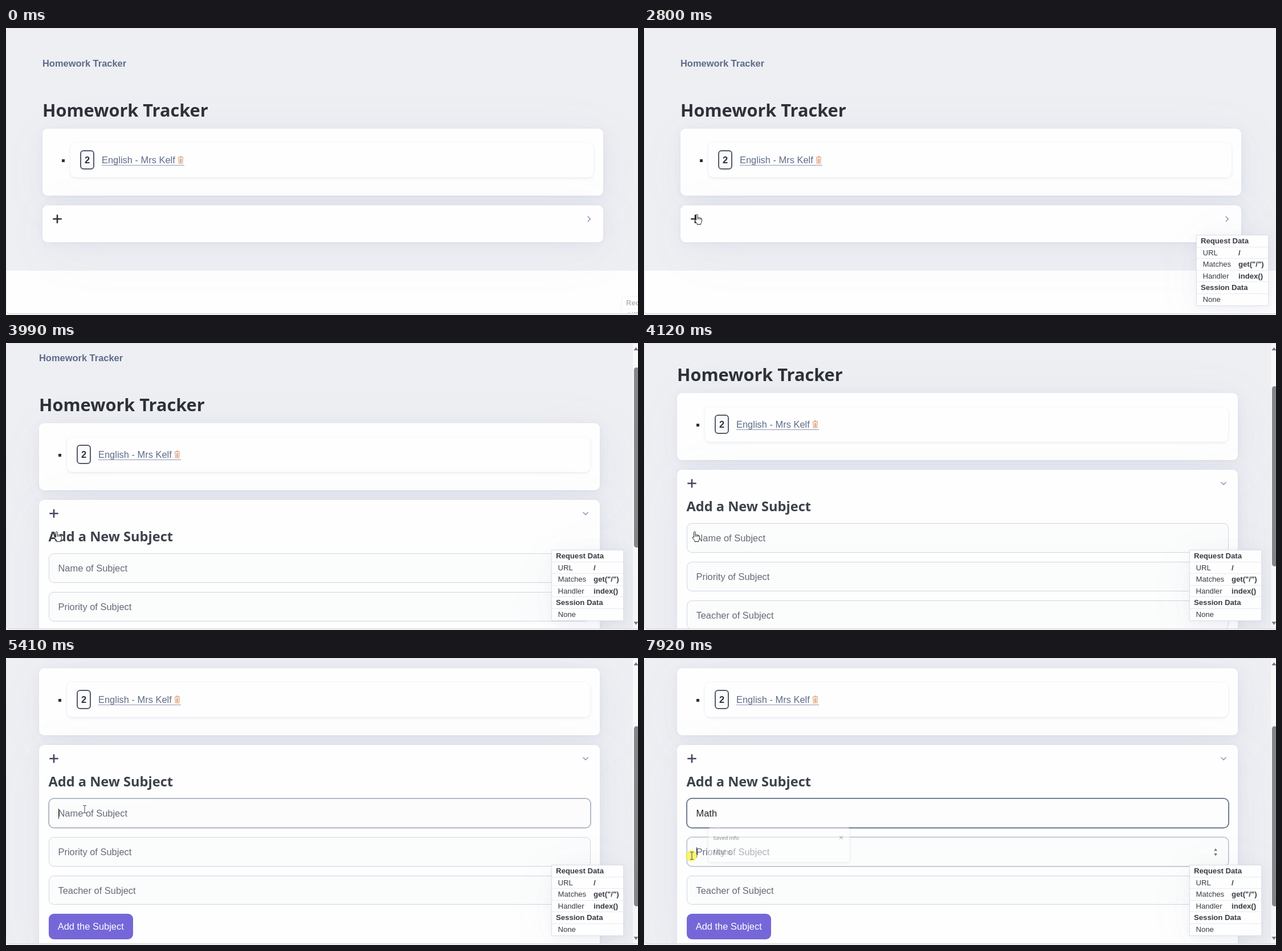
These frames come from a looping animation (1109 by 505 pixels, 8000 ms). An HTML page:

```html
<!DOCTYPE html>
<html lang="en">
<head>
<meta charset="utf-8">
<title>Homework Tracker</title>
<style>
  html, body { margin: 0; width: 100%; height: 100%; overflow: hidden; background: #fefefe; }
  body { position: relative; font: 16.45px/20px Arial, "Liberation Sans", sans-serif; color: #373c44; }
  div, span.t, svg { position: absolute; box-sizing: border-box; }
  svg { overflow: visible; }
  .t { white-space: nowrap; }
  #view { left: 0; top: 0; width: 1109px; height: 503px; overflow: hidden; background: #fefefe; border-radius: 6px 0 0 6px; }
  #page { left: 0; top: 0; width: 1109px; height: 900px; }
  #grey { left: -20px; top: -20px; width: 1160px; background: #eeeff3; }
  #frame { left: 0; top: 0; width: 1120px; height: 504px; border: 1px solid #e0e2e6; border-bottom: 2px solid #dfe1e4; border-radius: 6px; }
  .card, #panel {
    background: #fefefe;
    box-shadow: .24px .48px 2.9px rgba(129,145,181,.017), .55px 1.1px 6.6px rgba(129,145,181,.024),
      1px 2px 12.3px rgba(129,145,181,.03), 1.9px 3.7px 22px rgba(129,145,181,.036),
      3.4px 6.9px 41px rgba(129,145,181,.043), 8.2px 16.5px 99px rgba(129,145,181,.06),
      0 0 0 1px rgba(129,145,181,.015);
  }
  .card { left: 64px; width: 984px; border-radius: 9px; }
  .head { font-family: "Open Sans", "Noto Sans", sans-serif; font-weight: 700; color: #2d3138; }
  #item { left: 49px; top: 25px; width: 918px; height: 61px; border-radius: 9px; background: #fefefe; box-shadow: 0 1px 4px rgba(129,145,181,.22); }
  #badge { left: 17px; top: 13px; width: 25px; height: 34px; border: 2px solid #565a6c; border-radius: 6px; background: #f9fafc; font-weight: 700; line-height: 30px; text-align: center; color: #2d3138; }
  #link { left: 55px; top: 20px; width: 144.5px; height: 20px; color: #5d6b89; border-bottom: 1px solid #8d98b0; }
  .field { left: 16.5px; width: 951px; height: 51.5px; border: 1px solid #cfd5e2; border-radius: 9px; background: #fbfcfc; }
  .field .t { left: 16px; top: 15px; }
  .hint { color: #646b79; }
  .focus { inset: -2px; border: 2px solid #4b5a78; border-radius: 10px; background: #fefefe; opacity: 0; }
  .caret { display: inline-block; width: 1px; height: 18px; margin-right: -1px; vertical-align: -4px; background: #222; }
  .value { color: #23262c; }
  #button { left: 16.5px; top: 297.5px; width: 148.5px; height: 44.5px; border-radius: 9px; background: #7567d8; color: #fff; line-height: 44px; text-align: center; }
  #popup { left: 112px; top: 298px; width: 250px; height: 62px; border: 1px solid #e3e5e9; border-radius: 5px; background: #fefefe; box-shadow: 0 1px 4px rgba(0,0,0,.12); color: #555; opacity: 0; }
  #panel { left: 969px; top: 364px; width: 126.5px; height: 124.5px; border: 1px solid #dde2ec; font-size: 13.15px; }
  #panel div { left: 0; width: 100%; height: 20.5px; border-bottom: 1px solid #e7eaf0; }
  #panel div:last-child { border: 0; }
  #bar { left: 1100px; top: 1px; width: 9px; height: 502px; background: #f8f8f9; }
  #thumb { left: 2px; width: 9px; height: 317px; border-radius: 4.5px; background: #868789; }
  #halo { left: 73px; top: 338px; width: 20px; height: 20px; border-radius: 50%; background: rgba(247,241,70,.75); }
</style>
</head>
<body>
<div id="view">
  <div id="page">
    <div id="grey"></div>
    <span class="t" style="left:64px;top:52px;font-weight:700;color:#5d6b89">Homework Tracker</span>
    <span class="t head" style="left:64px;top:134px;font-size:30.7px">Homework Tracker</span>
    <div class="card" style="top:177px;height:118px">
      <div id="dot" style="left:33.5px;top:53.5px;width:5px;height:5px;background:#2d3138"></div>
      <div id="item">
        <div id="badge">2</div>
        <div id="link"><span class="t">English - Mrs Kelf</span>
          <svg id="bin" style="left:133px;top:3px" width="11" height="14" fill="none" stroke-width=".8"><path d="M1 2.5H10M4 2V.8H7V2M1.5 3L2.3 13.3H8.7L9.5 3M3.9 4.5L4.2 12M5.5 4.5V12M7.1 4.5L6.8 12"/></svg>
        </div>
      </div>
    </div>
    <div class="card" id="add" style="top:311.5px">
      <svg id="plus" style="left:18px;top:16.5px" width="16" height="16" stroke-width="2.6"><path d="M8 .5V15.5M.3 8H15.7"/></svg>
      <svg id="chev" style="left:954px;top:19.5px" width="10" height="10" fill="none" stroke="#7f90b4" stroke-width="1.4"><path d="M.5 2.8L5 7.2L9.5 2.8"/></svg>
      <div id="form" style="left:0;top:0;width:984px">
        <span class="t head" style="left:16.5px;top:54.5px;font-size:23.6px;color:#3d424b">Add a New Subject</span>
        <div class="field" style="top:94.5px"><div class="focus"></div><span class="t hint">Name of Subject</span><span class="t value"><span></span><i class="caret"></i></span></div>
        <div class="field" style="top:162.5px"><div class="focus"></div><span class="t hint">Priority of Subject</span><span class="t value"><span></span><i class="caret"></i></span>
          <svg id="spin" style="left:924px;top:18.5px" width="6" height="14" fill="#7d7476"><path d="M0 4.3L3 0L6 4.3ZM0 9L3 13.3L6 9Z"/></svg>
        </div>
        <div class="field" style="top:230px"><span class="t hint">Teacher of Subject</span></div>
        <div id="button">Add the Subject</div>
      </div>
    </div>
  </div>
  <div id="popup">
    <svg style="left:10px;top:-5px" width="12" height="6" fill="#fefefe" stroke="#dddfe3"><path d="M0 5L6 0L12 5"/></svg>
    <span class="t" style="left:8.5px;top:7.5px;font:600 9px/20px 'Open Sans',sans-serif">Saved info</span>
    <svg style="left:230px;top:14px" width="6" height="6" stroke="#555"><path d="M0 0L6 6M6 0L0 6"/></svg>
    <span class="t" style="left:8.5px;top:33px;font-size:12px">Maths</span>
  </div>
  <div id="bar">
    <svg width="9" height="502" fill="#77787b"><path d="M1.5 12L5.5 6.5L9.5 12ZM1.5 489.5L5.5 495L9.5 489.5Z"/></svg>
    <div id="thumb"></div>
  </div>
  <div id="panel"></div>
</div>
<div id="frame"></div>
<div id="halo"></div>
<svg class="cur" id="arrow" width="11" height="17"><path d="M.5 .5V13L3.4 10.4L5.3 15L7.4 14.1L5.5 9.7H9.3Z" fill="#fff" stroke="#222"/></svg>
<svg class="cur" id="hand" width="15" height="19"><path d="M3.5 10V1.8Q4.8 -.3 6.2 1.8V7Q7.6 5.6 8.8 7.2Q10.1 6 11.2 7.7Q13 7 13.4 9V13Q13 15.5 11.8 16.5V18.5H5V16.8L.9 11.6Q1 9.4 3.5 11ZM6.2 7V10M8.8 7.5V10M11.2 8V10" transform="translate(-5)" fill="#fff" stroke="#222"/></svg>
<svg class="cur" id="beam" width="7" height="14"><path d="M-3 -6.5H-.7L0 -6L.7 -6.5H3M0 -6V6M-3 6.5H-.7L0 6L.7 6.5H3" fill="none" stroke="#444"/></svg>
<script>
const LOOP = 8000;
const $ = id => document.getElementById(id);
const all = s => [...document.querySelectorAll(s)];
const clamp = v => Math.min(1, Math.max(0, v));
const smooth = u => u * u * (3 - 2 * u);
const show = (el, on) => { el.style.visibility = on ? 'visible' : 'hidden'; };

// Bursts of screen updates: start, end, count
const bursts = [
  [1040, 1330, 5], [1600, 2380, 11], [2450, 3210, 11], [3330, 3590, 4],
  [3890, 4390, 8], [4660, 5140, 8], [5340, 5490, 3], [5820, 5820, 1],
  [6100, 6100, 1], [6660, 6840, 3], [7110, 7850, 12], [7920, 7920, 1]
];

// Pointer path: time, x, y, shape
const path = [
  [1040, 476, 51, 'arrow'], [1330, 436, 110, 'arrow'], [1600, 422, 125, 'arrow'],
  [1912, 265, 299, 'arrow'], [2380, 104, 315, 'arrow'], [2450, 101, 319, 'hand'],
  [2900, 89, 331, 'hand'], [4319, 89, 331, 'hand'], [4390, 128, 297, 'arrow'],
  [4660, 132, 286, 'beam'], [4900, 140, 260, 'beam'], [5140, 138, 266, 'beam'],
  [7250, 138, 266, 'beam'], [7600, 71, 372, 'beam'], [7850, 84, 348, 'beam']
];

const typed = [[6100, 'M'], [6750, 'Ma'], [7110, 'Mat'], [7170, 'Math']];
const rows = [['Request Data'], ['URL', '/'], ['Matches', 'get("/")'], ['Handler', 'index()'], ['Session Data'], ['None', '']];

rows.forEach(([key, val], i) => {
  const row = $('panel').appendChild(document.createElement('div'));
  row.style.top = i * 20.5 + 'px';
  const cell = (text, x, bold) => {
    const s = row.appendChild(document.createElement('span'));
    s.className = 't';
    s.textContent = text;
    s.style.cssText = `left:${x}px;font-weight:${bold ? 700 : 400}`;
  };
  const title = val === undefined;
  cell(key, title ? 7 : 10.5, title);
  if (val) cell(val, 73, true);
});

const focus = all('.focus'), carets = all('.caret'), hints = all('.hint');
const value = document.querySelector('.value span'), cursors = all('.cur');

function tick(t) {
  let now = 0;
  for (const [a, b, n] of bursts) {
    if (t < a) break;
    const d = (b - a) / (n - 1 || 1);
    now = t >= b ? b : a + Math.floor((t - a) / d + 1e-6) * d;
  }
  return now;
}

function pointer(t) {
  const i = path.findLastIndex(p => p[0] <= t + .5);
  if (i < 0) return null;
  const a = path[i], b = path[i + 1] || a;
  const u = b === a ? 0 : clamp((t - a[0]) / (b[0] - a[0]));
  return { x: a[1] + (b[1] - a[1]) * u, y: a[2] + (b[2] - a[2]) * u, shape: a[3] };
}

function draw(t) {
  const ramp = (a, b) => clamp((t - a) / (b - a));
  const between = (a, b) => t >= a && t < b;
  const open = t >= 3330;
  const scroll = Math.round(159 * smooth(ramp(3770, 4390)));

  $('page').style.transform = `translate(${open ? -6 : 0}px,${-scroll}px)`;
  $('grey').style.height = (open ? 920 : 446.5) + 'px';
  $('add').style.height = (open ? 358 : 65.5) + 'px';
  show($('form'), open);
  show($('bar'), open);
  $('thumb').style.top = 19 + scroll * .627 + 'px';
  $('chev').style.transform = `rotate(${-90 * (1 - ramp(3250, 3590))}deg)`;
  $('plus').style.stroke = open ? '#44485f' : '#2d3138';

  const lift = between(1750, 2450);
  $('item').style.transform = $('dot').style.transform = `translateY(${lift ? -1 : 0}px)`;
  $('bin').style.stroke = lift ? '#8c8079' : '#d48650';

  const slide = smooth(ramp(980, 1330));
  $('panel').style.transform = `translate(${111 * (1 - slide) - (open ? 12 : 0)}px,${109 * (1 - slide)}px)`;
  $('panel').style.opacity = .35 + .65 * slide;

  const last = t >= 7920;
  focus[0].style.opacity = last ? .75 : ramp(5265, 5490);
  focus[1].style.opacity = last ? .2 : 0;
  const word = typed.findLast(k => t >= k[0]);
  value.textContent = word ? word[1] : '';
  show(hints[0], open && !word);
  show(carets[0], between(5340, 5820) || between(6100, 6660) || between(6740, 7680));
  show(carets[1], last);
  show($('spin'), between(4310, 4660) || t >= 7420);
  $('popup').style.opacity = last ? .5 : ramp(6660, 6840);
  show($('halo'), t >= 7850);

  const p = pointer(t);
  for (const c of cursors) {
    show(c, p && p.shape === c.id);
    if (p) { c.style.left = p.x + 'px'; c.style.top = p.y + 'px'; }
  }
}

function loop() {
  draw(tick(performance.now() % LOOP));
  requestAnimationFrame(loop);
}
loop();
</script>
</body>
</html>
```
